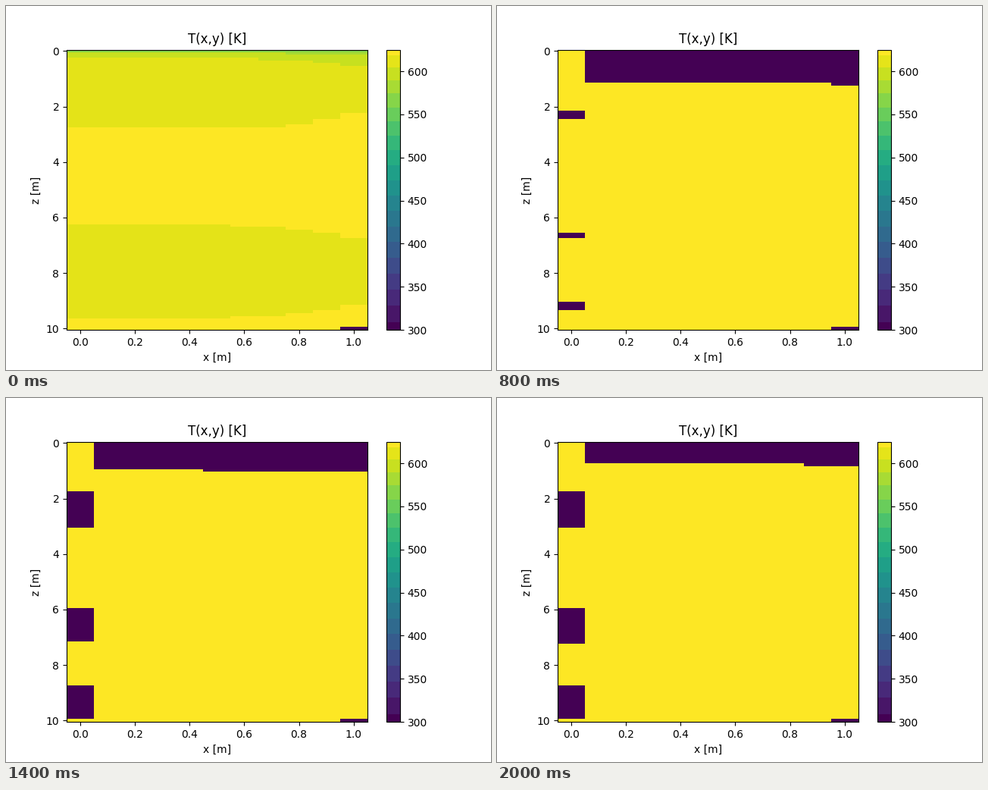
A matplotlib script for the animation above (2.1 s loop, 640x480 px).

```python
import matplotlib.pyplot as plt
import numpy as np
from matplotlib.animation import FuncAnimation
from matplotlib.colors import ListedColormap

COLS, ROWS, FRAMES = 11, 101, 21
COLD, WARM, HOT = 300, 610, 625
SPEED = 2.375  # columns the cooling front moves per frame
SETTLED = 7    # frame at which the front has left the field

# Cold pockets in the first column: centre, growth upwards and downwards.
POCKETS = [(23.5, 6, 8), (67.2, 7.4, 5.8), (92.5, 5, 7.8)]

col = np.arange(COLS)
row = np.arange(ROWS)[:, None]


def sigmoid(x):
    return 1 / (1 + np.exp(-x))


def banded_viridis(bands=19, size=740):
    """Viridis in steps that are slightly finer towards the hot end."""
    levels = 1 - (np.arange(bands, -1, -1) / bands) ** 1.1
    edges = (levels[1:] + levels[:-1]) / 2
    pos = (np.arange(size) + 0.5) / size
    return ListedColormap(plt.get_cmap("viridis")(levels)[np.searchsorted(edges, pos)])


def wave(t):
    """Cooling front travelling left; u is the distance ahead of it."""
    u = COLS - 1 - col - SPEED * t
    hot_top = np.rint(12.7 + 15.8 * sigmoid((u + 1.1) / 1.5))
    blob = np.rint(17.5 * np.tanh((u + 4.45) / 5))
    warm = (row < hot_top) | ((row >= 80 - blob) & (row < 80 + blob))

    reach = 6 + 7 * sigmoid(1 - u)
    bend = 0.5 + 2 * sigmoid(-(u + 2.2) / 0.6)
    drop = 50 + 220 * np.exp(-1.35 * (u + 4.5))
    chill = drop * np.clip(1 - (row / reach) ** bend, 0, None) ** 2
    return np.where(warm, WARM - chill, HOT)


def settled(t):
    """Cold top layer thinning from left to right, with growing pockets."""
    age = t - 8
    phase = 0.985 + 0.184 * age + 0.0114 * age ** 2
    depth = 13 - phase // 1 - (col < 10 * (phase % 1))
    cold = (row < depth) & (col > 0)

    grown = 1 - np.exp(-max(t - 7.3, 0) / 2.8)
    for centre, up, down in POCKETS:
        top, bottom = round(centre - up * grown), round(centre + down * grown)
        cold[top:bottom, 0] = True
    return np.where(cold, COLD, HOT)


def temperature(t):
    field = wave(t) if t < SETTLED else settled(t)
    field[-1, -1] = COLD
    return np.clip(field, COLD, HOT)


fig, ax = plt.subplots(figsize=(6.4, 4.8), dpi=100)
image = ax.imshow(temperature(0), cmap=banded_viridis(), vmin=COLD, vmax=HOT,
                  extent=(-0.05, 1.05, 10.05, -0.05), aspect="auto",
                  interpolation="nearest")
fig.colorbar(image, ax=ax)
ax.set_title("T(x,y) [K]")
ax.set_xlabel("x [m]")
ax.set_ylabel("z [m]")


def update(t):
    image.set_data(temperature(t))
    return [image]


anim = FuncAnimation(fig, update, frames=FRAMES, interval=100, repeat=True)
plt.show()
```
